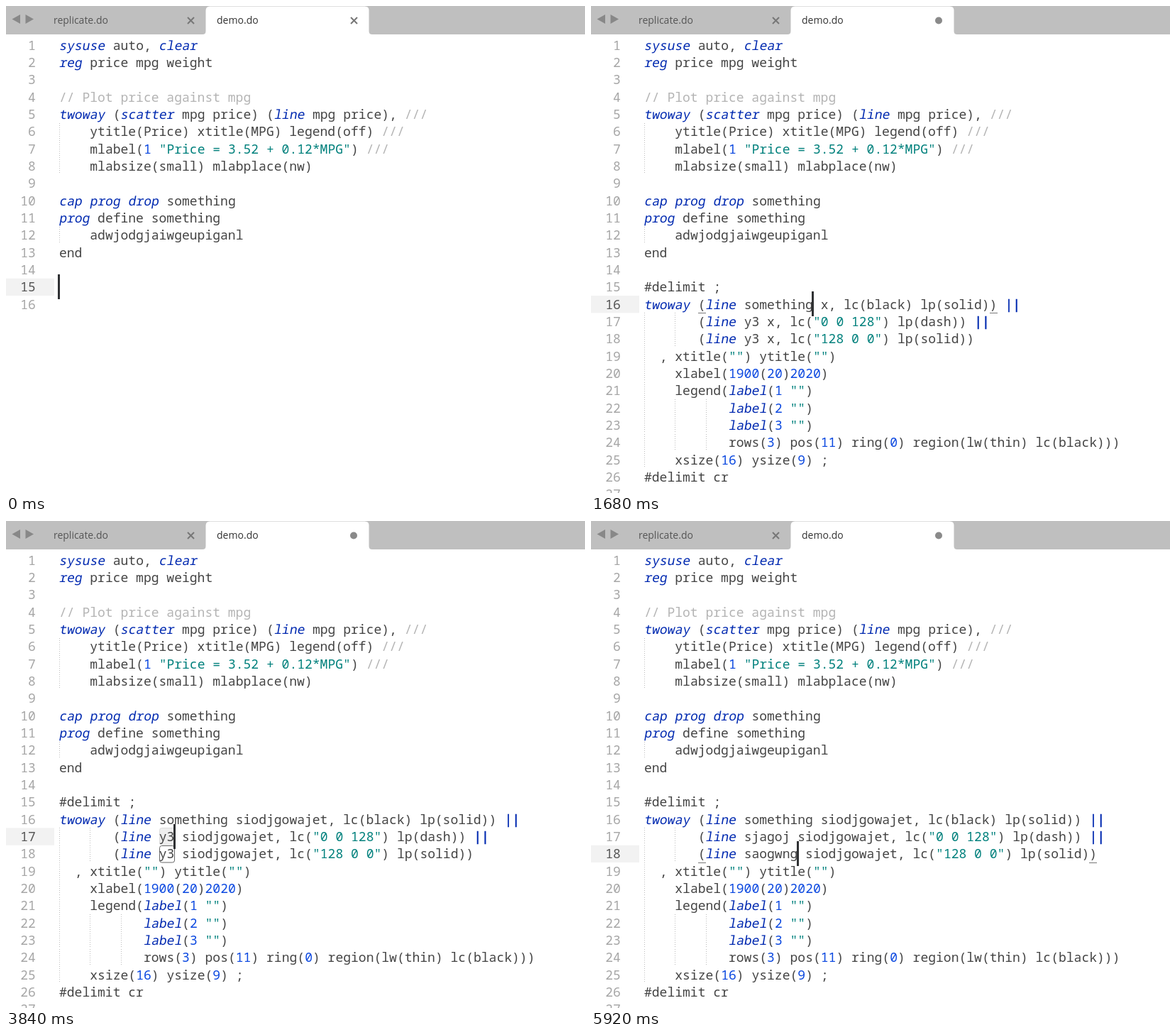
An HTML page for the animation above (6.44 s loop, 816 px wide and 686 px high).

```html
<!DOCTYPE html>
<html lang="en">
<head>
<meta charset="utf-8">
<title>Code editor</title>
<style>
  html, body { margin: 0; width: 100%; height: 100%; overflow: hidden; background: #fff; }
  svg { display: block; width: 816px; height: 686px; }
  #tabs text { font: 14px "Open Sans", "Noto Sans", sans-serif; }
  #page text { font: 18.03px "Noto Sans Mono", "DejaVu Sans Mono", monospace; fill: #444; white-space: pre; }
  #page .num { fill: #a6a6a6; text-anchor: end; }
  #page .on { fill: #555; }
  #page .key { fill: #0029b0; transform: skewX(-10deg); transform-box: fill-box; transform-origin: 0 65%; }
  #page .bar { fill: #0029b0; stroke: #0029b0; stroke-width: .6; }
  #page .val { fill: #0b48e0; }
  #page .str { fill: #00807c; }
  #page .rem { fill: #b4b4b4; }
  .guide { stroke: #bbb; stroke-dasharray: 1 2; shape-rendering: crispEdges; }
  .match { fill: none; stroke: #666; }
  .pick { fill: #eee; stroke: #ddd; }
  .pair { fill: #777; }
  .caret { fill: #2f3133; }
  .cross { stroke: #777; stroke-width: 2; }
</style>
</head>
<body>
<svg viewBox="0 0 816 686">
  <g id="tabs">
    <rect width="816" height="40" fill="#bfbfbf"/>
    <path d="M277 40q4.500 0 4.500-4.500V6.500q0-6 6-6H505.500q6 0 6 6V35.500q0 4.500 4.500 4.500z" fill="#fff"/>
    <path d="M20 12V25L8.500 18.500zM27.500 12V25L39 18.500z" fill="#888"/>
    <text x="67" y="25" fill="#555">replicate.do</text>
    <text x="297" y="25" fill="#333">demo.do</text>
    <path class="cross" d="M256 16l9 9m0-9l-9 9"/>
    <path class="cross" id="close" d="M486 16l9 9m0-9l-9 9"/>
    <circle id="dirty" cx="490" cy="20.500" r="5" fill="#8a8a8a"/>
  </g>
  <g id="page"></g>
</svg>
<script>
const LOOP = 6440, LEFT = 75, CHAR = 10.818, TOP = 43.1, ROW = 24.33;
const $ = id => document.getElementById(id);

const HEAD = [
  'sysuse auto, clear',
  'reg price mpg weight',
  '',
  '// Plot price against mpg',
  'twoway (scatter mpg price) (line mpg price), ///',
  '    ytitle(Price) xtitle(MPG) legend(off) ///',
  '    mlabel(1 "Price = 3.52 + 0.12*MPG") ///',
  '    mlabsize(small) mlabplace(nw)',
  '',
  'cap prog drop something',
  'prog define something',
  '    adwjodgjaiwgeupiganl',
  'end',
  ''
];

const snippet = ({ a, b, c, x }) => [
  '#delimit ;',
  `twoway (line ${a} ${x}, lc(black) lp(solid)) ||`,
  `       (line ${b} ${x}, lc("0 0 128") lp(dash)) ||`,
  `       (line ${c} ${x}, lc("128 0 0") lp(solid))`,
  '  , xtitle("") ytitle("")',
  '    xlabel(1900(20)2020)',
  '    legend(label(1 "")',
  '           label(2 "")',
  '           label(3 "")',
  '           rows(3) pos(11) ring(0) region(lw(thin) lc(black)))',
  '    xsize(16) ysize(9) ;',
  '#delimit cr',
  ''
];

// Steps: time, field being edited, its value
const BLANK = { cmd: '', a: 'y1', x: 'x', b: 'y3', c: 'y3' };
const pick = (time, field) => [[time, field, BLANK[field]]];
const type = (field, word, ...times) => times.map((time, i) =>
  [time, field, word.slice(0, Math.round((i + 1) * word.length / times.length))]);

const STEPS = [
  ...pick(0, 'cmd'),
  ...type('cmd', 'twoway', 40, 120, 320, 400, 520, 600),
  ...pick(840, 'a'),
  ...type('a', 'some', 1040, 1120, 1200, 1240),
  ...type('a', 'something', 1680),
  ...pick(2360, 'x'),
  ...type('x', 'siodjgowajet', 3080, 3120, 3200, 3240, 3320, 3360, 3440, 3480, 3560, 3600),
  ...pick(3840, 'b'),
  ...type('b', 'sjagoj', 4480, 4520, 4560, 4600, 4640),
  ...pick(5000, 'c'),
  ...type('c', 'saogwng', 5480, 5520, 5600, 5640, 5800, 5880, 5920)
];

const TOKENS = new RegExp([
  '(?<rem>//.*$)',
  '(?<str>"[^"]*")',
  '(?<key>\\b(?:sysuse|clear|reg|twoway|tw|scatter|line|cap|prog|drop|label|so)\\b)',
  '(?<bar>\\|\\|)',
  '(?<val>\\b\\d+\\b)'
].join('|'), 'g');

const colX = col => LEFT + col * CHAR;
const rowY = row => TOP + (row - 1) * ROW;
const text = (x, row, cls, s) =>
  `<text x="${x.toFixed(2)}" y="${(rowY(row) + 18.5).toFixed(2)}" class="${cls}">${s}</text>`;
const rect = (cls, x, y, w, h, extra = '') =>
  `<rect class="${cls}" x="${x}" y="${y}" width="${w}" height="${h}" ${extra}/>`;
const box = (cls, row, col, n) =>
  rect(cls, Math.round(colX(col)) + .5, Math.round(rowY(row)) + .5, n * CHAR - .6, 23.5, 'rx="3"');
const caret = (row, col) => rect('caret', Math.round(colX(col) - 1.6), Math.round(rowY(row) - 5.6), 3, 35);
const underline = (row, col) => rect('pair', Math.round(colX(col)), Math.round(rowY(row + 1)), 11, 1);

function codeLine(s, row) {
  let out = '', at = 0;
  const put = (part, cls) => {
    const lead = part.length - part.trimStart().length;
    if (part.trim()) out += text(colX(at + lead), row, cls, part.trim());
    at += part.length;
  };
  for (const m of s.matchAll(TOKENS)) {
    put(s.slice(at, m.index), 'txt');
    put(m[0], Object.keys(m.groups).find(k => m.groups[k]));
  }
  put(s.slice(at), 'txt');
  return out;
}

function guides(s, row) {
  let out = '';
  for (let col = 0; col < s.search(/\S|$/); col += 4) {
    out += `<path class="guide" d="M${Math.round(colX(col)) + .5} ${Math.round(rowY(row))}v24"/>`;
  }
  return out;
}

// Start columns of the edited field, as [row, column]
function places(field, v) {
  return {
    cmd: [[15, 0]],
    a: [[16, 13]],
    b: [[17, 13]],
    c: [[18, 13]],
    x: [v.a, v.b, v.c].map((name, i) => [16 + i, 14 + name.length])
  }[field];
}

function draw(step) {
  const v = { ...BLANK };
  STEPS.slice(0, step + 1).forEach(([, field, value]) => v[field] = value);
  const field = STEPS[step][1], word = v[field];
  const lines = HEAD.concat(field === 'cmd' ? [v.cmd, ''] : snippet(v));
  const spots = places(field, v), rows = spots.map(p => p[0]);
  const selected = field !== 'cmd' && word === BLANK[field];

  let out = rows.map(r => rect('', 0, rowY(r), 68, ROW, 'fill="#f2f2f2"')).join('');
  if (selected) {
    out += spots.map(([r, c]) => box('pick', r, c, word.length)).join('');
    if (field === 'b') out += box('match', 18, 13, 2);
  }
  lines.forEach((s, i) => {
    const row = i + 1;
    out += guides(s, row) + text(41.8, row, rows.includes(row) ? 'num on' : 'num', row) + codeLine(s, row);
  });
  if (!selected && 'abc'.includes(field)) {
    const row = rows[0];
    out += underline(row, 7) + underline(row, lines[row - 1].lastIndexOf(')'));
  }
  out += spots.map(([r, c]) => caret(r, c + word.length)).join('');

  $('page').innerHTML = out;
  $('close').style.display = step ? 'none' : '';
  $('dirty').style.display = step ? '' : 'none';
}

const start = performance.now();
let shown = -1;
function tick() {
  const t = (performance.now() - start) % LOOP;
  const step = STEPS.findLastIndex(s => s[0] <= t);
  if (step !== shown) draw(shown = step);
  requestAnimationFrame(tick);
}
tick();
</script>
</body>
</html>
```
